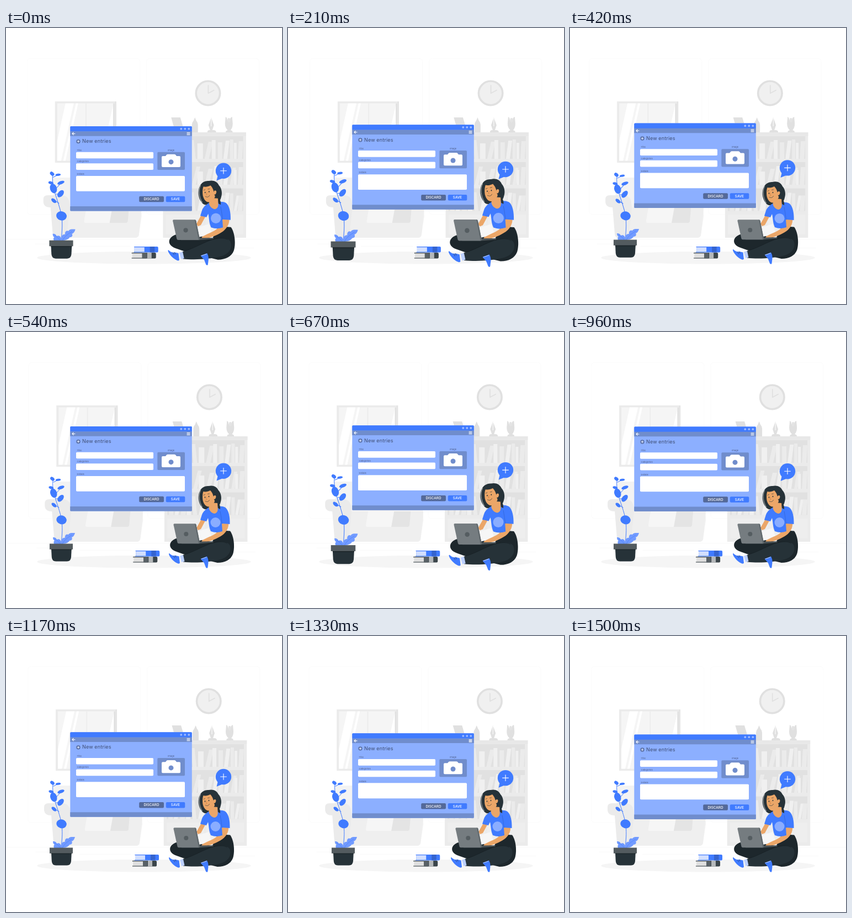
Write an HTML page that moves like this. It is 500 px wide and 500 px high and loops after 1540 ms.

```html
<!DOCTYPE html>
<html lang="en">
<head>
<meta charset="utf-8">
<title>New entries</title>
<style>
html, body { margin: 0; width: 100%; height: 100%; overflow: hidden; background: #fff; }
svg { display: block; width: 100vw; height: 100vh; }
text { font-family: Inter, "Open Sans", sans-serif; }
.label { font-size: 4.1px; fill: #4d5d88; }
.btn { font-size: 6.3px; font-weight: 500; fill: #fff; text-anchor: middle; }
.line { fill: none; stroke-linecap: round; stroke-linejoin: round; }
</style>
</head>
<body>
<svg viewBox="0 0 500 500">
  <ellipse cx="250" cy="416.2" rx="193.9" ry="11.3" fill="#f5f5f5"/>

  <g id="room">
    <g fill="#ebebeb">
      <rect y="382.4" width="500" height=".3"/>
      <rect x="416.8" y="398.5" width="33" height=".3"/>
      <rect x="322.5" y="401.2" width="8.7" height=".3"/>
      <rect x="396.6" y="389.2" width="19" height=".3"/>
      <rect x="52.5" y="390.9" width="43" height=".3"/>
      <rect x="104.5" y="390.9" width="6.3" height=".3"/>
      <rect x="131.5" y="395.1" width="93.7" height=".3"/>
    </g>
    <g fill="none" stroke="#f8f8f8" stroke-width=".6">
      <rect x="38.7" y="55.2" width="204" height="282.5" rx="5.5"/>
      <rect x="254.8" y="55.2" width="204" height="282.5" rx="5.5"/>
    </g>

    <!-- wall window -->
    <rect x="89" y="133" width="111" height="111" fill="#ebebeb"/>
    <path d="M197.500 133h2.500v111h-2.500z" fill="#e4e4e4"/>
    <path d="M93 136.500h104v104H93z" fill="#f5f5f5"/>
    <path d="M108 136.500h15l-23 104h-7v-36zM127 136.500h4l-23 104h-4zM194 141v40h-9z" fill="#fff"/>
    <path d="M144.500 136.500h1.500v104h-1.500z" fill="#ebebeb"/>
    <path d="M194.500 136.500h2.500v104h-2.500z" fill="#e0e0e0"/>

    <!-- armchair -->
    <path d="M84 271H232q10 0 11 10l3 60-5 33q-1 6-7 6H92z" fill="#f3f3f3"/>
    <path d="M76 303H100q14 0 15 14l5 63H92q-6 0-7-6l-4-49q-12 0-13-9v-6q0-7 8-7z" fill="#ebebeb"/>
    <path d="M116 325H246l-5 50q-1 5-7 5H110z" fill="#efefef"/>
    <path d="M146 325h47l-5 28h-44q-3 0-2-5z" fill="#f6f6f6"/>
    <path d="M193 325h30l-2 24q0 4-4 4h-29z" fill="#e4e4e4"/>

    <!-- bookcase -->
    <rect x="284.700" y="189" width="150.500" height="191" fill="#ebebeb"/>
    <path d="M284.700 189h150.500v6.500H284.700z" fill="#e8e8e8"/>
    <path d="M290 338h68v36h-68zM362 338h68v36h-68z" fill="#eeeeee"/>
    <g id="shelves"></g>
    <g fill="#e0e0e0">
      <path d="M299.500 162H316l8 27H307z"/>
      <path d="M337 189v-14q0-4 3-7l2.500-6 2.500 6q3 3 3 7v14z"/>
      <path d="M365 189q0-4 4-4h1l-3-9 5-14 5 14-3 9h2q5 0 5 4z"/>
      <path d="M398 189q0-3 4-4-5-4-5-12l1-12q3 1 3 6h5q0-5 4-6l1 12q0 8-4 12 4 1 4 4z"/>
    </g>
    <path d="M372 163v15" stroke="#fff" stroke-width="1"/>
    <ellipse cx="404" cy="167" rx="2.600" ry="4" fill="#e4e4e4"/>

    <!-- clock -->
    <circle cx="366.200" cy="118" r="21.700" fill="#f0f0f0" stroke="#e0e0e0" stroke-width="3.600"/>
    <path d="M366.700 104v14.300l10.300-5.600" class="line" stroke="#e0e0e0" stroke-width="1.700"/>

    <!-- stacked books -->
    <path d="M232 396h42q2 0 2 2v6.500q0 2-2 2H231l2-1.500v-7.500z" fill="#407bff"/>
    <path d="M233 397.200h18v8.200h-18z" fill="#d2dfff"/>
    <path d="M261 396h8.500v10.500H261z" fill="#3564cf"/>
    <path d="M228 407h42q2 0 2 2v6.500q0 2-2 2H228v-1.200h2v-7.800h-2z" fill="#3b454a"/>
    <path d="M229 408.200h18v8.200h-18z" fill="#dedede"/>
    <path d="M247 407h8v10.500h-8z" fill="#596166"/>
    <path d="M256 407h8v10.500h-8z" fill="#b5b8ba"/>
  </g>

  <g id="plant">
    <path d="M100 385c1-14 3-25 1-43-2-15-11-36-14-49-2-9-3-16-2-25M86 272l9-4M83 282l6 12M91 292l9-10M91 302l8 0M88 313l8 5" class="line" stroke="#407bff" stroke-width="1"/>
    <g fill="#407bff" id="leaves"></g>
    <path d="M101 384c-1-8-5-10-9-8-1-3-4-4.500-7-4 0 3 1 5 3 6-2 1-2 3-1 6z" fill="#6d98ff"/>
    <path d="M100.500 384c-2-7 2-12 6.500-11-1-4 2-8 6-6 2-4 8-3 12-3-1 4-3 7-6 8 2 3 0 6-4 6-1 3-7 6-14.500 6z" fill="#729bff"/>
    <path d="M98 383q-4-5-9-8M102 384q4-9 17-16" class="line" stroke="#407bff" stroke-width=".6"/>
    <path d="M82 393h36.800l-.8 15q-.8 7.600-7.500 7.600H90.300q-6.700 0-7.500-7.600z" fill="#263238"/>
    <rect x="79" y="383.500" width="42" height="10.300" fill="#535b5f"/>
    <path d="M82 393.800h36.800v1.300H82z" fill="#1b2428"/>
  </g>

  <g id="panel">
    <rect x="116.300" y="178.500" width="220.500" height="153.500" rx="1.500" fill="#8cafff"/>
    <path d="M116.300 188v-8q0-1.500 1.500-1.500h217.500q1.500 0 1.500 1.500v8z" fill="#407bff"/>
    <path d="M116.300 187.800h220.500v8.400H116.300zM116.300 323.500h220.500v7q0 1.500-1.500 1.500H117.800q-1.500 0-1.500-1.500z" fill="#708dcc"/>
    <g fill="#9dbaff">
      <circle cx="317.300" cy="183.200" r="1.900"/><circle cx="324.300" cy="183.200" r="1.900"/><circle cx="331.300" cy="183.200" r="1.900"/>
    </g>
    <path d="M125 192h-5m2.200-2.200L120 192l2.200 2.200M328 190h5m-5 2h5m-5 2h5" class="line" stroke="#fff" stroke-width="1.100"/>
    <circle cx="131" cy="206" r="3.700" fill="#5a70a6"/>
    <path d="M128.800 206h4.400m-2.200-2.200v4.400" stroke="#dbe6ff" stroke-width="1.200"/>
    <text x="138" y="208.800" font-size="9" letter-spacing=".15" fill="#3f4e73">New entries</text>
    <g class="label">
      <text x="128.500" y="223.200">Title</text>
      <text x="128.500" y="243.800">Categories</text>
      <text x="128.500" y="266.700">Details</text>
      <text x="299.200" y="223.200" text-anchor="middle">Image</text>
    </g>
    <g fill="#fff">
      <rect x="127" y="225.200" width="140" height="11.700" rx="1.800"/>
      <rect x="127" y="245.800" width="140" height="11.700" rx="1.800"/>
      <rect x="127" y="268.500" width="197" height="27.800" rx="1.800"/>
    </g>
    <rect x="274.300" y="225.200" width="49.700" height="32.300" rx="1.800" fill="#708dcc"/>
    <path d="M284 232.500h5l2-2.400q.6-.8 2-.8h12q1.400 0 2 .8l2 2.400h5q2 0 2 2v16q0 2-2 2h-30q-2 0-2-2v-16q0-2 2-2z" fill="#fff"/>
    <circle cx="299" cy="243.200" r="4.500" fill="#708dcc"/>
    <rect x="241.200" y="305.200" width="44.800" height="10.500" rx="2" fill="#546999"/>
    <rect x="289.800" y="305.200" width="34.500" height="10.500" rx="2" fill="#407bff"/>
    <text class="btn" x="263.500" y="312.700">DISCARD</text>
    <text class="btn" x="307" y="312.700">SAVE</text>
  </g>

  <g id="woman">
    <!-- hair behind -->
    <path d="M367 279c8-2 15 1 18 8 5 5 6 14 4 20-1 5-3 8-6 10l-18 4c-5 1-9-1-11-5-4-5-6-13-5-20 1-8 5-14 11-16 2-1 5-1 7-1z" fill="#263238"/>
    <path d="M352.500 287c-4 8-3 20 3 30" class="line" stroke="#fff" stroke-width=".6"/>
    <!-- legs -->
    <path d="M384 359l22 1.500c7 9 9 30 5 42-4 10-14 15.500-28 15.500l-25-6z" fill="#1d272c"/>
    <path d="M329 371c-14 0-27 3-31 11-3 7 2 13 11 16 15 6 30 9 45 14l13-4 12-26z" fill="#1d272c"/>
    <path d="M319 404.500c17-4 32-14 49-20 16-6 31-7 37 1 5 11-2 23-18 27-20 5-47 6-66 4z" fill="#263238"/>
    <path d="M322 403.500c18-5 32-14 48-20 12-4 24-5 30-1" class="line" stroke="#131b1f" stroke-width=".6"/>
    <!-- feet -->
    <path d="M315 405.500l6-1.500 2.500 11.500-5.500 1.500z" fill="#bcd0ff"/>
    <path d="M296 401c3 3 6 5 11 4l6.500 1.500 1.500 12q-1.500 2-4.500.500c-7-3-14-11-15.500-16.500q0-2 1-1.500z" fill="#407bff"/>
    <path d="M304 406l1.500 3m1-4l1.500 3" class="line" stroke="#263238" stroke-width=".6"/>
    <path d="M352.500 411l11.500-4.500q3 5 2.500 11l-1 9q-1 2.500-3.500 0l-3-8z" fill="#407bff"/>
    <path d="M354 411l9-3" class="line" stroke="#bcd0ff" stroke-width="1"/>
    <!-- torso -->
    <path d="M348 361l19-6 6 18-23 5z" fill="#f6f6f6"/>
    <path d="M354 339l7 3-8 15-5 2-3-4z" fill="#eba668"/>
    <path d="M389 343l14 3c1 8-4 17-11 22-9 6-20 11-33 13-4 1-6-2-3-4l8-4c12-5 22-10 24-19z" fill="#eba668"/>
    <path d="M369 317c-6 3-12 8-14 14l-3 9.500 11 2.500 3-6c2 9 1 15 5 24q10 4 21 0l-1-14 14.500 1c.5-13-2-25-8-30-5-3-16-3-28.500-1z" fill="#407bff"/>
    <path d="M388 325c2 9 2 14 3.500 22" class="line" stroke="#2f5fc9" stroke-width=".6"/>
    <circle cx="379.500" cy="345" r="9" fill="#8aadff"/>
    <path d="M369 309l15 1-.5 7c1 7-1 11-6 12-5-1-9-5-10-10z" fill="#eba668"/>
    <path d="M383 309q6 4 5 12l-4-2z" fill="#263238"/>
    <!-- face -->
    <path d="M359 286c7-4 16-1 18 8l1 13c-2 5-6 9-10 9.500-6 .5-10-5-11.500-12-1-7-.5-14 2.500-18.500z" fill="#eba668"/>
    <path d="M357 289c3-8 14-11 21-6 7 5 9 14 7 24l-8-3c-1-8-3-13-7-17-4 2-8 3-13 2z" fill="#263238"/>
    <ellipse cx="378" cy="299.500" rx="2.400" ry="3.600" fill="#eba668" transform="rotate(15 378 299)"/>
    <g fill="#263238"><ellipse cx="360.500" cy="299.500" rx=".8" ry="1.200"/><ellipse cx="367.500" cy="298" rx=".8" ry="1.200"/></g>
    <path d="M358 295.500l2.500-1m5-1l3-.5M361 306.500q5 3 7.500-2" class="line" stroke="#263238" stroke-width=".6"/>
    <path d="M363.500 299.500l-1 4 1.500 0" class="line" stroke="#c9783b" stroke-width=".6"/>
    <!-- laptop -->
    <path d="M349 379.500l26-.2q2 1.500-1 2.200l-24 2H318v-1.500z" fill="#4b5357"/>
    <path d="M305 347.300h37q2 0 2.500 2l6.500 32q0 2-2 2h-36q-2 0-2.500-2l-7-32q0-2 1.500-2z" fill="#757c80"/>
    <path d="M342 347.300q2 0 2.500 2l6.500 32q0 2-2 2l-7-36z" fill="#60686c"/>
    <circle cx="326.300" cy="366" r="4" fill="#555d61"/>
  </g>

  <g id="bubble">
    <circle cx="394" cy="259.300" r="14.200" fill="#407bff"/>
    <path d="M384 267l-2.500 10 10-4z" fill="#407bff"/>
    <path d="M388.200 259.300h11.600m-5.800-5.800v11.600" stroke="#fff" stroke-width="1.100"/>
  </g>
</svg>
<script>
const el = id => document.getElementById(id);

// rows of books: x, width, height, lean
const books = [[293, 8, 31, 0], [303, 7, 28, 8], [314, 9, 33, 0], [325, 8, 30, 0], [337, 7, 34, -5],
  [347, 10, 28, 0], [360, 8, 31, 10], [373, 7, 34, 0], [384, 8, 30, 0], [394, 7, 33, 6],
  [406, 6, 35, 0], [413, 5, 29, 0], [420, 8, 32, 8]];
let shelves = "";
[196, 243, 290.5].forEach((top, row) => {
  shelves += `<rect x="290" y="${top}" width="140" height="41" fill="#e1e1e1"/>`;
  books.forEach(([x, w, h, lean], i) => {
    const tall = h - (i * 3 + row * 4) % 5 * (row ? 1 : 0);
    const tilt = row && i % 3 === row ? 7 - lean : lean;
    const right = Math.min(x + tilt * .7, 430 - w);
    shelves += `<path d="M${x} ${top + 41}L${right} ${top + 41 - tall}h${w}L${x + w} ${top + 41}z" fill="${i % 2 ? "#f0f0f0" : "#ebebeb"}"/>`;
  });
});
el("shelves").innerHTML = shelves;

// leaves: x, y, rx, ry, angle
el("leaves").innerHTML = [[84, 266, 3, 4.3, -50], [94.5, 267.8, 4.7, 2, -8], [81.8, 282, 4.5, 2.5, 15],
  [99.5, 281.8, 6.5, 2.9, -20], [86.3, 292, 6, 8.5, -18], [99, 301.2, 4.5, 7.3, 40],
  [87, 313.5, 5.3, 3, 40], [100.5, 340.3, 9.3, 8, 15]]
  .map(([x, y, a, b, r]) => `<ellipse cx="${x}" cy="${y}" rx="${a}" ry="${b}" transform="rotate(${r} ${x} ${y})"/>`).join("");

// linear interpolation through [position, value] stops
function track(stops, p) {
  const i = Math.max(1, stops.findIndex(s => s[0] >= p));
  const [a, u] = stops[i - 1], [b, v] = stops[i];
  return u + (v - u) * (p - a) / (b - a);
}
const shake = [0, -1, 2, -4, 4, -4, 4, -4, 2, -1, 0].map((v, i) => [i / 10, v]);
const beat = [[0, 1], [.1, 1.1], [.3, 1], [.4, 1], [.5, 1.1], [.6, 1], [1, 1]];
const float = [[0, 0], [.5, -10], [1, 0]];

const LOOP = 1540, STEPS = 37;
const move = (id, x, y) => el(id).setAttribute("transform", `translate(${x} ${y})`);
const zoom = (id, s, x, y) =>
  el(id).setAttribute("transform", `translate(${x} ${y}) scale(${s}) translate(${-x} ${-y})`);

function draw(ms) {
  const step = Math.min(STEPS - 1, Math.floor((ms % LOOP + 5) * 24 / 1000));
  const p = (step + 1) / STEPS;
  const rise = track(float, p), size = track(beat, p);
  move("room", track(shake, p), 0);
  move("panel", 0, rise);
  move("bubble", 0, rise);
  zoom("woman", size, 353.7, 353);
  zoom("plant", size, 100.2, 339);
}
function tick() {
  draw(performance.now());
  requestAnimationFrame(tick);
}
tick();
</script>
</body>
</html>
```
